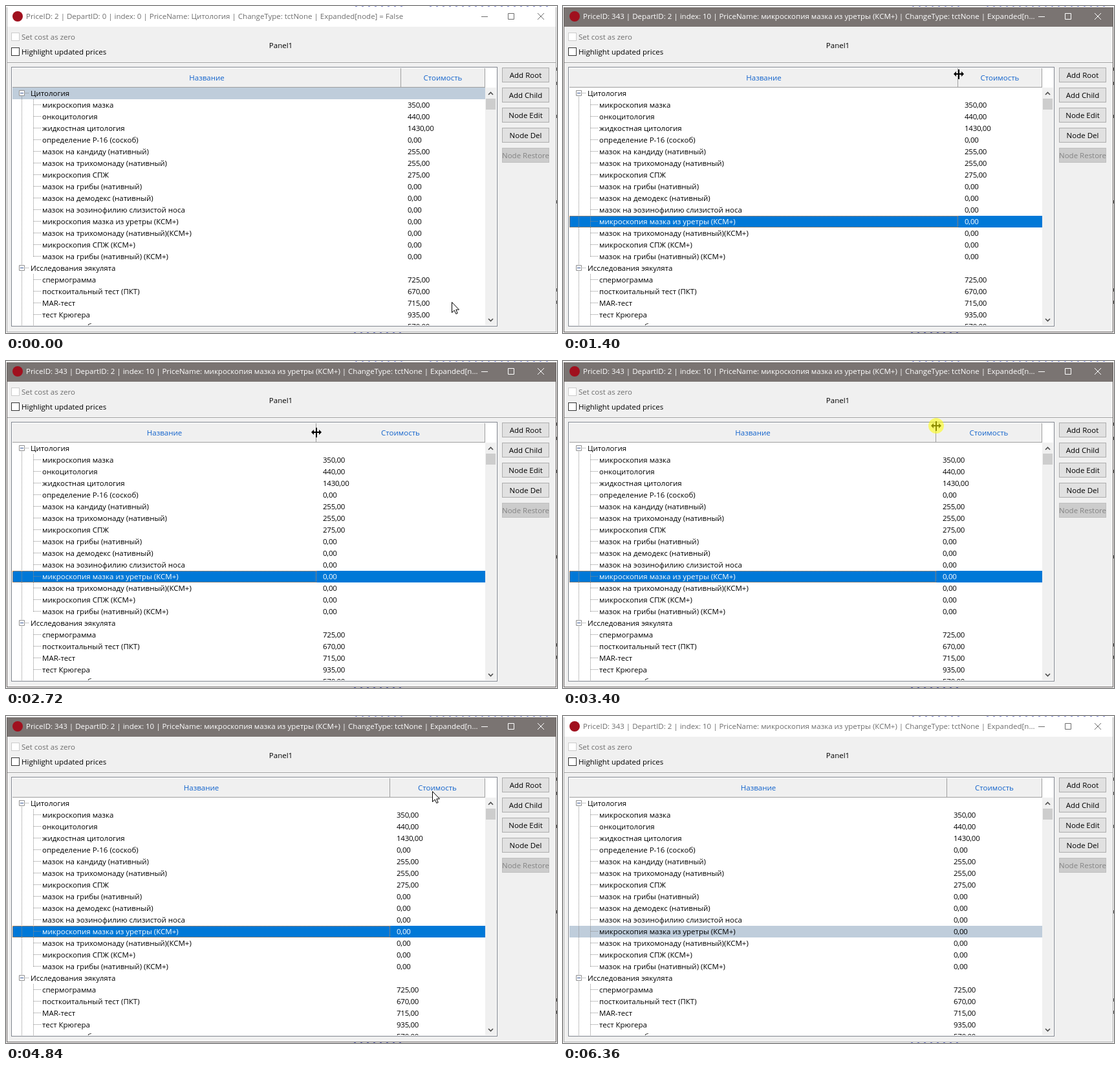
Recreate the animation shown at these times as an HTML page. Size 852 px wide and 505 px high, loop 6440 ms.

```html
<!DOCTYPE html>
<html lang="ru">
<head>
<meta charset="utf-8">
<title>Price tree</title>
<style>
html, body { margin: 0; width: 100%; height: 100%; overflow: hidden; background: #fff; }
#stage { position: relative; width: 852px; height: 505px; overflow: hidden;
  font: 11.5px/18px "Open Sans", "Noto Sans", sans-serif; color: #000; white-space: nowrap; }
#stage div, #stage svg { position: absolute; box-sizing: border-box; }
.speck { width: 1px; height: 5px; background: #555; }
.code { height: 1px; background: repeating-linear-gradient(90deg, #8088d0 0 3px, #fff 3px 10px); }

#win { left: 1px; top: 2px; width: 850px; height: 502px; background: #f0f0f0; border: 1px solid #aaa; }
#bar { left: 2px; top: 2px; width: 848px; height: 30px; background: #fff; color: #6e6e6e; }
#bar svg { left: 0; top: 0; }
#caption { left: 29px; top: 5px; }
#icon { left: 8px; top: 6px; width: 16px; height: 16px; border-radius: 50%; background: #a0101e; }
.active #win { border-color: #676260; }
.active #bar { background: #7a7472; color: #fff; }

.rule { left: 2px; top: 87px; width: 848px; height: 2px; background: #a0a0a0; border-bottom: 1px solid #fff; }
.check { left: 8px; width: 13px; height: 13px; border: 1px solid #333; background: #fff; }
.button { left: 767px; width: 73px; height: 23px; line-height: 21px;
  background: #e1e1e1; border: 1px solid #adadad; display: flex; justify-content: center; }
.off { color: #6d6d6d; }
.check.off { border-color: #ccc; }
.button.off { background: #ccc; border-color: #bfbfbf; color: #838383; }

#list { left: 8px; top: 94px; width: 752px; height: 401px; background: #fff; border: 1px solid #828790; }
#body { left: 10px; top: 96px; width: 748px; height: 397px; overflow: hidden; }
#head { left: 0; top: 0; width: 731px; height: 30px; background: #f0f0f0;
  border-bottom: 1px solid #a0a0a0; border-right: 1px solid #a0a0a0; }
.label { top: 6px; text-align: center; color: #1263cc; }
#split { top: 0; width: 1px; height: 29px; background: #a0a0a0; }
#rows { left: 0; top: 30px; width: 731px; }
.row { left: 0; width: 731px; height: 18px; }
.cost { top: 0; letter-spacing: -.25px; }
.sel { background: #bfcddb; }
.active .sel { background: #0078d7; color: #fff; }
#focus { left: 0; height: 18px; border: 1px dotted #ff8728; visibility: hidden; }
.active #focus { visibility: visible; }
#tree { left: 0; top: 0; }
#track { left: 731px; top: 30px; width: 17px; height: 367px; background: #f0f0f0; }
#thumb { left: 732px; top: 47px; width: 15px; height: 17px; background: #cdcdcd; }
#hscroll { left: 0; top: 380px; width: 731px; height: 17px; background: #f0f0f0; }
#hthumb { left: 17px; top: 1px; width: 690px; height: 15px; background: #cdcdcd; }
.arrows { left: 0; top: 0; fill: none; stroke: #505050; stroke-width: 1.7; }
#pointer { left: 0; top: 0; width: 24px; height: 24px; overflow: visible; }
</style>
</head>
<body>
<div id="stage">
  <div class="code" style="left:540px;top:0;width:76px"></div>
  <div class="code" style="left:655px;top:0;width:190px"></div>
  <div class="code" style="left:538px;top:504px;width:78px"></div>
  <div id="win"></div>
  <div id="bar">
    <div id="icon"></div>
    <div id="caption"></div>
    <svg width="848" height="30" fill="none" stroke="currentColor">
      <path d="M733 14.5h10M774.5 9.5h9v9h-9zM820 9l10 10M830 9l-10 10"/>
    </svg>
  </div>
  <div class="check off" style="top:41px"></div>
  <div class="off" style="left:24px;top:39px">Set cost as zero</div>
  <div class="check" style="top:64px"></div>
  <div style="left:24px;top:62px">Highlight updated prices</div>
  <div style="left:375px;width:100px;top:52px;text-align:center">Panel1</div>
  <div class="rule"></div>
  <div id="list"></div>
  <div id="body">
    <div id="head">
      <div class="label" id="nameLabel" style="left:0">Название</div>
      <div class="label" id="costLabel">Стоимость</div>
      <div id="split"></div>
    </div>
    <div id="rows"></div>
    <svg id="tree" width="731" height="397" fill="none">
      <path id="lines" stroke="#8c8c8c" stroke-dasharray="1 1"/>
      <path id="boxes" stroke="#919191" fill="#fff"/>
      <path id="minus" stroke="#3c5a96"/>
    </svg>
    <div id="focus"></div>
    <div id="track"></div>
    <div id="thumb"></div>
    <div id="hscroll">
      <div id="hthumb"></div>
      <svg class="arrows" width="731" height="17"><path d="M10 5l-3.5 3.5 3.5 3.5M720 5l3.5 3.5-3.5 3.5"/></svg>
    </div>
    <svg class="arrows" width="748" height="397">
      <path d="M736 41l3.5-3.5 3.5 3.5M736 387l3.5 3.5 3.5-3.5"/>
      <path id="extra" d="M736 370l3.5 3.5 3.5-3.5"/>
    </svg>
  </div>
  <svg id="pointer">
    <path id="arrow" d="M.5 .5V16.5L4.2 13 6.8 18.5 9.2 17.5 6.8 12H11.5Z" fill="#fff" stroke="#000"/>
    <path id="resize" d="M-1-7H1V-1H4V-4L8 0 4 4V1H1V8H-1V1H-4V4L-8 0-4-4V-1H-1Z"/>
    <circle id="glow" r="12" fill="#ff0"/>
  </svg>
</div>
<script>
const LOOP = 6440, STEP = 40;
const $ = id => document.getElementById(id);
const stage = $('stage');

function add(parent, cls, text, style) {
  const el = document.createElement('div');
  el.className = cls;
  el.textContent = text;
  Object.assign(el.style, style);
  parent.append(el);
  return el;
}

// Names starting with "#" are top-level nodes.
const items = [
  ['#Цитология', ''], ['микроскопия мазка', 350], ['онкоцитология', 440],
  ['жидкостная цитология', 1430], ['определение Р-16 (соскоб)', 0],
  ['мазок на кандиду (нативный)', 255], ['мазок на трихомонаду (нативный)', 255],
  ['микроскопия СПЖ', 275], ['мазок на грибы (нативный)', 0],
  ['мазок на демодекс (нативный)', 0], ['мазок на эозинофилию слизистой носа', 0],
  ['микроскопия мазка из уретры (КСМ+)', 0], ['мазок на трихомонаду (нативный)(КСМ+)', 0],
  ['микроскопия СПЖ (КСМ+)', 0], ['мазок на грибы (нативный) (КСМ+)', 0],
  ['#Исследования эякулята', ''], ['спермограмма', 725], ['посткоитальный тест (ПКТ)', 670],
  ['MAR-тест', 715], ['тест Крюгера', 935], ['маркеры на бел', 570]
];

let lines = 'M14.5 44V397M32.5 48V291M32.5 318V397', boxes = '', minus = '';
const rows = items.map(([name, cost], i) => {
  const root = name[0] === '#', top = 18 * i, mid = top + 38.5;
  const row = add($('rows'), 'row', '', { top: top + 'px' });
  add(row, '', root ? name.slice(1) : name, { left: (root ? 28 : 46) + 'px', top: 0 });
  const price = add(row, 'cost', cost === '' ? '' : cost + ',00', {});
  lines += root ? `M20 ${mid}h6` : `M33 ${mid}h11`;
  if (root) {
    boxes += `M10.5 ${mid - 4}h8v8h-8z`;
    minus += `M12 ${mid}h5`;
  }
  return { row, price };
});
$('lines').setAttribute('d', lines);
$('boxes').setAttribute('d', boxes);
$('minus').setAttribute('d', minus);

['Add Root', 'Add Child', 'Node Edit', 'Node Del', 'Node Restore'].forEach((name, i) =>
  add(stage, 'button' + (i === 4 ? ' off' : ''), name, { top: 95 + 31 * i + 'px' }));
[95, 117, 168, 300, 436, 455].forEach(y =>
  add(stage, 'speck', '', { left: '851px', top: y + 'px' }));

// [time, x, y]
const path = [
  [40, 689, 457], [400, 591, 333], [600, 591, 333], [1200, 612, 104], [1360, 612, 104],
  [1480, 612, 109], [1640, 612, 109], [2160, 480, 110], [2720, 480, 110],
  [3280, 577, 100], [3400, 577, 100], [4000, 594, 111], [4040, 594, 111],
  [4320, 505, 131], [4720, 659, 114], [4840, 659, 116], [5040, 598, 111], [5400, 651, 484]
];
// [time, column edge]
const edge = [[1640, 611], [2200, 480], [2720, 480], [3280, 577], [3400, 577], [4000, 594]];
// [time, opacity]
const glow = [
  [559, 0], [560, .55], [640, .55], [760, 0], [1679, 0], [1680, .55], [2320, .55], [2480, 0],
  [2759, 0], [2760, .55], [3880, .55], [4000, 0]
];

// Eased value of column k of a track at time t.
function at(track, t, k = 1) {
  const i = track.findIndex(p => p[0] >= t);
  if (i < 0) return track[track.length - 1][k];
  if (i === 0) return track[0][k];
  const a = track[i - 1], b = track[i];
  const u = (t - a[0]) / (b[0] - a[0]);
  return a[k] + (b[k] - a[k]) * u * u * (3 - 2 * u);
}

const show = (el, on) => el.style.display = on ? '' : 'none';

function draw(t) {
  const active = t >= 560 && t < 6360;
  const selected = t < 560 ? 0 : 11;
  const x = Math.round(at(path, t)), y = Math.round(at(path, t, 2));
  const col = Math.round(at(edge, t));

  stage.classList.toggle('active', active);
  $('caption').textContent = t < 560
    ? 'PriceID: 2 | DepartID: 0 | index: 0 | PriceName: Цитология | ChangeType: tctNone | Expanded[node] = False'
    : 'PriceID: 343 | DepartID: 2 | index: 10 | PriceName: микроскопия мазка из уретры (КСМ+) | ChangeType: tctNone | Expanded[n...';

  rows.forEach(({ row, price }, i) => {
    row.classList.toggle('sel', i === selected);
    price.style.left = col + 'px';
  });
  $('focus').style.top = 30 + 18 * selected + 'px';
  $('focus').style.width = col - 10 + 'px';
  $('split').style.left = col - 11 + 'px';
  $('nameLabel').style.width = col - 10 + 'px';
  $('costLabel').style.left = col - 10 + 'px';
  $('costLabel').style.width = 740 - col + 'px';
  // The horizontal bar flashes while the columns resize.
  show($('hscroll'), t >= 1840 && t < 1920);
  show($('extra'), t >= 1840 && t < 2000);

  const dragging = t >= 1680 && t < 4040;
  const sizing = dragging || (Math.abs(x - col) <= 6 && y < 125);
  $('pointer').style.transform = `translate(${x}px, ${y}px)`;
  show($('pointer'), t < 5480);
  show($('arrow'), !sizing);
  show($('resize'), sizing);
  $('glow').style.opacity = at(glow, t);
}

function tick() {
  const t = performance.now() % LOOP;
  draw(Math.floor(t / STEP) * STEP);
  requestAnimationFrame(tick);
}
tick();
</script>
</body>
</html>
```
